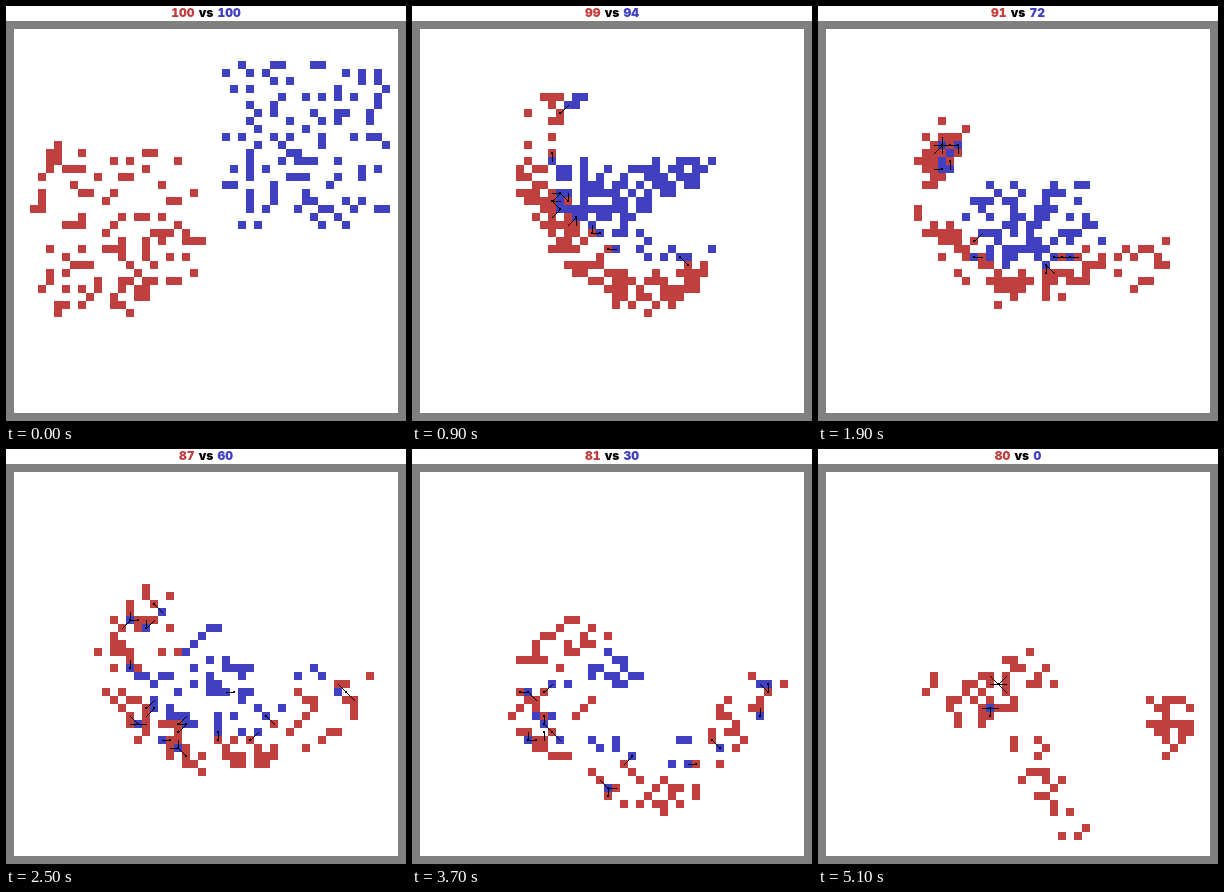
An HTML page with a canvas that plays this animation: 400 by 415 pixels, repeating every 5200 ms.

```html
<!DOCTYPE html>
<html lang="en">
<head>
<meta charset="utf-8">
<title>Red vs blue</title>
<style>
  html, body { margin: 0; width: 100%; height: 100%; overflow: hidden; background: #fff; }
  canvas { position: absolute; left: 0; top: 0; }
  #score {
    position: absolute; left: 0; top: 0; width: 400px; text-align: center;
    font: 900 12px/13px Inter, sans-serif; font-variant-numeric: tabular-nums;
    word-spacing: 1px; white-space: nowrap;
  }
  #red { color: #c04040; }
  #blue { color: #4040c0; }
</style>
</head>
<body>
<canvas id="field" width="400" height="415"></canvas>
<div id="score"><span id="red"></span> vs <span id="blue"></span></div>
<script>
const CELL = 8, TOP = 15, LOOP = 5200, STEP = 100;
const COLORS = ['#c04040', '#4040c0'];
const ctx = document.getElementById('field').getContext('2d');
const labels = ['red', 'blue'].map(id => document.getElementById(id));

function seeded(seed) {
  return () => {
    seed = (seed + 0x6d2b79f5) | 0;
    let n = Math.imul(seed ^ (seed >>> 15), 1 | seed);
    n = (n + Math.imul(n ^ (n >>> 7), 61 | n)) ^ n;
    return ((n ^ (n >>> 14)) >>> 0) / 2 ** 32;
  };
}

const random = seeded(42);
const phases = [];
const armies = [[], []];
const spread = size => (random() * 2 - 1) * size;
const clamp = n => Math.max(1, Math.min(48, Math.round(n)));
const distance = (a, b) => (a[0] - b[0]) ** 2 + (a[1] - b[1]) ** 2;
const last = list => list[list.length - 1];

// Units strewn along a polyline of x, y pairs, in cells.
function line(count, width, ...points) {
  const sections = points.length / 2 - 1;
  return taken => Array.from({ length: count }, (_, i) => {
    const at = sections * (i + 0.5) / count, k = Math.floor(at) * 2;
    const along = a => {
      const from = points[k + a], to = points[k + a + 2] ?? from;
      return from + (to - from) * (at % 1);
    };
    for (let tries = 0; ; tries++) {
      const size = width + tries / 20;
      const spot = [clamp(along(0) + spread(size)), clamp(along(1) + spread(size))];
      if (!taken.has(spot.join())) {
        taken.add(spot.join());
        return spot;
      }
    }
  });
}

// Pairs units with spots by swapping until the total walk is short.
function assign(units, spots) {
  const goals = units.map((_, i) => spots[i]);
  const cost = (i, goal) => goal ? distance(last(units[i].path), goal) : 0;
  for (let pass = 0; pass < 12; pass++)
    for (let i = 0; i < units.length; i++)
      for (let j = 0; j < i; j++)
        if (cost(i, goals[j]) + cost(j, goals[i]) < cost(i, goals[i]) + cost(j, goals[j]))
          [goals[i], goals[j]] = [goals[j], goals[i]];
  return goals;
}

function phase(at, score, red, blue) {
  const taken = new Set(), before = last(phases);
  const place = lines => lines.flatMap(fill => fill(taken));
  const blueSpots = place(blue);
  const spots = [place(red), blueSpots];
  armies.forEach((army, side) => {
    if (!before) {
      for (const spot of spots[side])
        army.push({ side, path: [spot], end: Infinity, sway: [spread(1.5), spread(1.5)] });
      return;
    }
    const living = army.filter(unit => unit.end === Infinity);
    const goals = assign(living, spots[side]);
    living.forEach((unit, i) => {
      let goal = goals[i];
      if (!goal) { // falls on the way to the nearest enemy
        const here = last(unit.path);
        goal = spots[1 - side].reduce((a, b) => distance(here, b) < distance(here, a) ? b : a);
        unit.end = before.at + (at - before.at) * (0.05 + 0.9 * random());
      }
      unit.path.push(goal);
    });
  });
  phases.push({ at, score });
}

phase(0, [100, 100],
  [line(100, 10.4, 13.4, 25.6)],
  [line(100, 10.4, 37, 15)]);
phase(300, [100, 100],
  [line(60, 1.6, 18, 13, 18, 20, 25, 28, 32, 30), line(40, 4, 15, 25, 20, 31, 28, 32)],
  [line(45, 4, 23, 16, 25, 24), line(55, 4, 30, 18, 36, 18)]);
phase(900, [99, 94],
  [line(11, 2, 18, 9, 15, 14), line(88, 2, 14, 17, 17, 24, 22, 30, 28, 34, 36, 31)],
  [line(4, 1, 20, 10), line(50, 3, 19, 19, 22, 21, 27, 25),
   line(32, 2.5, 27, 21, 35, 18), line(8, 1, 25, 28, 37, 29)]);
phase(1900, [91, 72],
  [line(22, 2, 17, 13, 13, 19), line(56, 1.8, 13, 24, 17, 28, 23, 33, 29, 32, 35, 29),
   line(13, 3, 38, 30, 43, 30)],
  [line(6, 1, 16, 14, 15, 19), line(66, 4, 20, 23, 25, 27, 32, 23)]);
phase(3100, [82, 48],
  [line(20, 2.5, 20, 19, 14, 22), line(46, 1.7, 12, 29, 16, 33, 22, 38, 29, 40, 36, 37),
   line(16, 2, 38, 32, 43, 27)],
  [line(18, 2, 25, 26, 28, 27), line(27, 1.2, 13, 28, 17, 32, 22, 36, 36, 34), line(3, 1.5, 43, 26)]);
phase(4300, [80, 12],
  [line(27, 2, 14, 26, 19, 24, 25, 23), line(14, 2, 13, 28, 16, 36),
   line(21, 2, 26, 37, 29, 43, 36, 41), line(18, 2.5, 38, 37, 39, 31, 43, 28)],
  [line(8, 1.5, 18, 25, 23, 23), line(5, 1, 14, 28, 15, 34), line(4, 1, 24, 33),
   line(6, 1.5, 34, 40, 39, 32)]);
phase(5100, [80, 0],
  [line(38, 2.5, 13, 28, 20, 30, 22, 28, 28, 24), line(20, 2.5, 24, 34, 32, 45),
   line(22, 2.5, 43, 29, 44, 35)],
  [line(1, 0, 21, 30)]);

const units = armies.flat();

function locate(unit, time, taken) {
  const k = Math.min(phases.filter(p => p.at <= time).length, unit.path.length) - 1;
  const from = unit.path[k], to = unit.path[k + 1] || from;
  const start = phases[k].at;
  const stop = Math.min(unit.end, phases[k + 1] ? phases[k + 1].at : LOOP);
  const f = Math.min(1, (time - start) / (stop - start));
  const arc = Math.sin(Math.PI * f);
  const [x, y] = from.map((n, a) => clamp(n + (to[a] - n) * f + unit.sway[a] * arc));
  for (let i = 0; i < 17; i++) { // step aside when the cell is occupied
    const r = Math.ceil(i / 8), turn = i * Math.PI / 4;
    const cell = [clamp(x + r * Math.cos(turn)), clamp(y + r * Math.sin(turn))];
    if (!taken.has(cell.join())) {
      taken.add(cell.join());
      return cell;
    }
  }
  return [x, y];
}

function drawStrike([x, y], [tx, ty]) {
  const px = x * CELL + 4, py = TOP + y * CELL + 4;
  for (let i = 0; i <= CELL; i++)
    ctx.fillRect(px + (tx - x) * i, py + (ty - y) * i, 1, 1);
  ctx.fillRect(tx * CELL + 3, TOP + ty * CELL + 3, 2, 2);
}

function draw(frame) {
  const time = frame * STEP, chance = seeded(frame * 977), taken = new Set();
  ctx.fillStyle = '#fff';
  ctx.fillRect(0, 0, 400, 415);
  ctx.fillStyle = '#808080';
  ctx.fillRect(0, TOP, 400, 400);
  ctx.fillStyle = '#fff';
  ctx.fillRect(CELL, TOP + CELL, 384, 384);

  const present = units.filter(u => time < u.end + STEP)
    .map(u => ({ side: u.side, alive: time <= u.end, cell: locate(u, time, taken) }));
  for (const { side, alive, cell: [x, y] } of present) {
    if (!alive) continue;
    ctx.fillStyle = COLORS[side];
    ctx.fillRect(x * CELL, TOP + y * CELL, CELL, CELL);
  }
  ctx.fillStyle = '#000';
  for (const unit of present) {
    const foe = unit.alive && present.find(o => o.side !== unit.side && distance(o.cell, unit.cell) <= 2);
    if (foe && chance() < 0.45) drawStrike(unit.cell, foe.cell);
  }

  const next = phases.find(p => p.at > time) || last(phases);
  const prev = last(phases.filter(p => p.at <= time));
  const f = next === prev ? 0 : (time - prev.at) / (next.at - prev.at);
  labels.forEach((label, side) => {
    label.textContent = Math.round(prev.score[side] + (next.score[side] - prev.score[side]) * f);
  });
}

let shown = -1;
const begin = performance.now();
function tick() {
  const frame = Math.floor((performance.now() - begin) % LOOP / STEP);
  if (frame !== shown) draw(shown = frame);
  requestAnimationFrame(tick);
}
tick();
</script>
</body>
</html>
```
